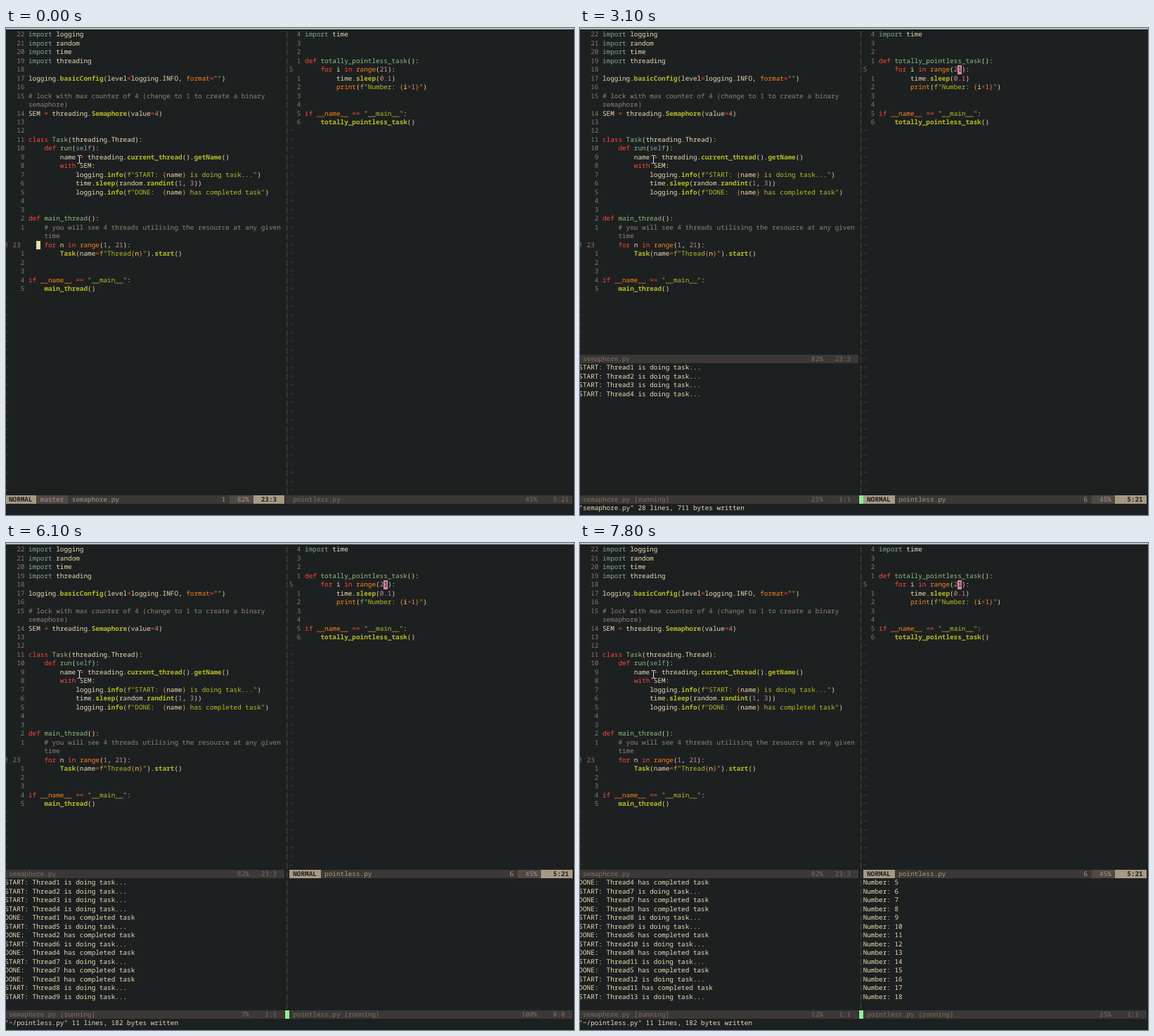
Animation, 808 px wide and 693 px high, one loop 8000 ms. Source, as an HTML page:

```html
<!DOCTYPE html>
<html lang="en">
<head>
<meta charset="utf-8">
<title>Running code in split windows</title>
<style>
html, body { margin: 0; width: 100%; height: 100%; overflow: hidden; background: #1d2021; }
#stage {
  position: relative; width: 808px; height: 693px; overflow: hidden; background: #1d2021; color: #ebdbb2;
  font: 500 9.36px/12.48px "Noto Sans Mono", "DejaVu Sans Mono", monospace;
  text-rendering: geometricPrecision; font-variant-ligatures: none;
}
#edge { position: absolute; left: 0; top: 0; width: 808px; height: 2px; background: #b9bdbd; }
pre { position: absolute; margin: 0; font: inherit; white-space: pre; }
b { font-weight: inherit; }
pre.bar b { display: inline-block; height: 12.48px; vertical-align: top; }
svg { position: absolute; left: 0; top: 0; }
.comment { color: #928374; }
.gutter { color: #857a6d; }
.string { color: #b8bb26; }
.include, .self { color: #83a598; }
.def { color: #8ec07c; }
.key, .op { color: #fb4934; }
.builtin, .brace { color: #fe8019; }
.num { color: #d3869b; }
.call { color: #b8bb26; font-weight: 700; }
.plain { color: #ebdbb2; }
.tilde { color: #504945; }
.split { color: #665c54; }
.mode { color: #1d2021; background: #a89984; font-weight: 700; }
.info { color: #a89984; background: #504945; }
.mid { color: #a89984; background: #3c3836; }
.off { color: #7c6f64; background: #3c3836; }
.job { background: #90ee90; }
.block { background: #ebdbb2; }
.pick { color: #1d2021; background: #d3869b; }
</style>
</head>
<body>
<div id="stage">
  <div id="edge"></div>
  <div id="code"></div>
  <div id="live"></div>
  <svg width="808" height="693" fill="none">
    <g id="beam">
      <path d="M101.5 181.5h2.2l.8.8.8-.8h2.2M104.5 182v10M101.5 192.5h2.2l.8-.8.8.8h2.2" stroke="#1d2021" stroke-width="2.6"/>
      <path d="M101.5 181.5h2.2l.8.8.8-.8h2.2M104.5 182v10M101.5 192.5h2.2l.8-.8.8.8h2.2" stroke="#e8e8e8"/>
    </g>
    <path id="arrow" d="M104.5 186.5v10.6l2.6-2.3h4.9z" fill="#25282a" stroke="#d8d8d8" stroke-width=".9"/>
  </svg>
</div>
<script>
const LOOP = 8000, CELL_W = 5.616, CELL_H = 12.48, LEFT = -1.7, TOP = 3.16;
const SPLIT = 71, RIGHT = 72, MID = 37, LAST = 53, CMD = 54;
const $ = id => document.getElementById(id);

const semaphore = `   22 import logging
   21 import random
   20 import time
   19 import threading
   18
   17 logging.basicConfig(level=logging.INFO, format="")
   16
   15 # lock with max counter of 4 (change to 1 to create a binary~      semaphore)
   14 SEM = threading.Semaphore(value=4)
   13
   12
   11 class Task(threading.Thread):
   10     def run(self):
    9         name = threading.current_thread().getName()
    8         with SEM:
    7             logging.info(f"START: {name} is doing task...")
    6             time.sleep(random.randint(1, 3))
    5             logging.info(f"DONE:  {name} has completed task")
    4
    3
    2 def main_thread():
    1     # you will see 4 threads utilising the resource at any given~          time
! 23      for n in range(1, 21):
    1         Task(name=f"Thread{n}").start()
    2
    3
    4 if __name__ == "__main__":
    5     main_thread()`;

const pointless = `  4 import time
  3
  2
  1 def totally_pointless_task():
5       for i in range(21):
  1         time.sleep(0.1)
  2         print(f"Number: {i+1}")
  3
  4
  5 if __name__ == "__main__":
  6     totally_pointless_task()`;

const kinds = ['comment', 'string', 'include', 'def', 'key', 'builtin', 'self', 'op', 'num', 'call'];
const syntax = /(#.*)|(f?"[^"]*")|(\bimport\b)|((?<=class |def )\w+)|(\b(?:class|def|with|for|in|if)\b)|(\b(?:range|format|print|__name__)\b)|(\bself\b)|(==?|\+)|(\b\d+(?:\.\d+)?)|(\b\w+(?=\())/g;

const tag = (cls, text) => `<b class="${cls}">${text}</b>`;
const put = (col, row, html, cls = '') =>
  `<pre class="${cls}" style="left:${LEFT + col * CELL_W}px;top:${TOP + row * CELL_H}px">${html}</pre>`;

function highlight(code) {
  return code.replace(syntax, (text, ...groups) => {
    const kind = kinds[groups.findIndex(g => g !== undefined)];
    if (text.startsWith('f"')) {
      text = text.replace(/\{(.*?)\}/g, (_, inner) =>
        tag('brace', '{') + tag('plain', highlight(inner)) + tag('brace', '}'));
    }
    return tag(kind, text);
  });
}

const listing = (source, gutter) => source.split('\n').map(line =>
  tag('gutter', line.slice(0, gutter).replace('!', tag('include', '!'))) +
  highlight(line.slice(gutter)).replace('~', '\n')).join('\n');

$('code').innerHTML = put(0, 0, listing(semaphore, 6)) + put(RIGHT, 0, listing(pointless, 4)) +
  put(SPLIT, 0, '|\n'.repeat(LAST), 'split');

// Timed tables: [start, value]
const firstKeys = [200, 700, 1000, 1200, 1500, 1700, 1800, 2000];
const nextKeys = [3900, 4300, 4500, 4600, 5100, 5400, 5500, 5600];
const threadLog = [
  [2500, 'S1 S2 S3 S4'], [4500, 'D1 S5 D2 S6 D4 S7'], [5500, 'D7 D3 S8 S9'],
  [6500, 'D6 S10 D8 S11'], [7400, 'D5 S12'], [7600, 'D11 S13']];
const counter = [
  [0, 0], [6300, 3], [6400, 4], [6500, 6], [6700, 7], [6800, 8], [6900, 9], [7000, 11],
  [7200, 12], [7300, 13], [7400, 15], [7600, 16], [7700, 17], [7800, 18]];
const leftPct = [[2500, '100%'], [3100, '25%'], [6100, '7%'], [6500, '25%'], [7400, '16%'], [7600, '12%']];
const rightPct = [[6100, '100%'], [7600, '50%'], [7700, '33%'], [7800, '25%']];

const valueAt = (table, t) => table.filter(([start]) => start <= t).pop()[1];
const typed = (keys, t) => ':RunCode'.slice(0, keys.filter(k => k <= t).length);
const tail = lines => lines.slice(-14).join('\n');

function threadLines(t) {
  return threadLog.filter(([start]) => start <= t).flatMap(([, events]) => events.split(' ')).map(e =>
    e[0] === 'S' ? `START: Thread${e.slice(1)} is doing task...` : `DONE:  Thread${e.slice(1)} has completed task`);
}

function status(col, row, width, { name, pct, pos, mode, branch, count }) {
  const [line, column] = pos.split(':');
  const pctText = pct.padStart(5) + ' ';
  const posText = ` ${line.padStart(3)}:${column.padEnd(2)} `;
  if (!mode) return put(col, row, tag('off', ` ${name}`.padEnd(width - 14) + pctText + posText), 'bar');
  const head = ` ${mode} `, git = branch ? ` ${branch} ` : '';
  const mid = ` ${name}`.padEnd(width - 16 - head.length - git.length) + count + ' ';
  return put(col, row, tag('mode', head) + (git && tag('info', git)) + tag('mid', mid) +
    tag('info', pctText) + tag('mode', posText), 'bar');
}

const tildes = (col, from, to) => put(col, from, '~\n'.repeat(to - from), 'tilde');
const cursor = (col, row, cls, text = ' ') => put(col, row, tag(cls, text), 'bar');

function draw(t) {
  const leftSplit = t >= 2500, rightSplit = t >= 6100, onRight = t >= 3100;
  const typing = (t >= 200 && t < 2400) || (t >= 3900 && t < 5900);
  const command = (t >= 200 && t < 2500) || (t >= 3900 && t < 6100);
  const mode = command ? 'COMMAND' : 'NORMAL';
  const leftEnd = leftSplit ? MID : LAST, rightEnd = rightSplit ? MID : LAST;

  let html = tildes(0, 30, leftEnd) + tildes(RIGHT, 11, rightEnd);
  html += cursor(SPLIT, LAST, leftSplit ? 'job' : 'mid');
  html += status(0, leftEnd, 71, {
    name: 'semaphore.py', pct: '82%', pos: '23:3', mode: !onRight && mode, branch: 'master', count: 1 });
  html += status(RIGHT, rightEnd, 72, {
    name: 'pointless.py', pct: '45%', pos: '5:21', mode: onRight && mode, count: 6 });

  if (leftSplit) {
    html += put(0, MID + 1, tail(threadLines(t))) + status(0, LAST, 71, {
      name: 'semaphore.py [running]', pct: valueAt(leftPct, t), pos: onRight ? '1:1' : '0:0' });
  }
  if (rightSplit) {
    const numbers = Array.from({ length: valueAt(counter, t) }, (_, i) => `Number: ${i + 1}`);
    html += put(RIGHT, MID + 1, tail(numbers)) + status(RIGHT, LAST, 72, {
      name: 'pointless.py [running]', pct: valueAt(rightPct, t), pos: t < 6300 ? '0:0' : '1:1' });
  }

  if (typing) {
    const text = typed(t < 2400 ? firstKeys : nextKeys, t);
    html += put(0, CMD, text) + cursor(text.length, CMD, 'block');
  } else if (t >= 5900) {
    html += put(0, CMD, '"~/pointless.py" 11 lines, 182 bytes written');
  } else if (t >= 2400) {
    html += put(0, CMD, '"semaphore.py" 28 lines, 711 bytes written');
  }
  if (!command) html += onRight ? cursor(96, 4, 'pick', '1') : cursor(8, 24, 'block');

  $('live').innerHTML = html;
  $('beam').style.display = typing ? 'none' : '';
  $('arrow').style.display = typing ? '' : 'none';
}

const begin = performance.now();
let shown = -1;
function tick() {
  const step = Math.floor((performance.now() - begin) % LOOP / 100);
  if (step !== shown) draw((shown = step) * 100);
  requestAnimationFrame(tick);
}
tick();
</script>
</body>
</html>
```
